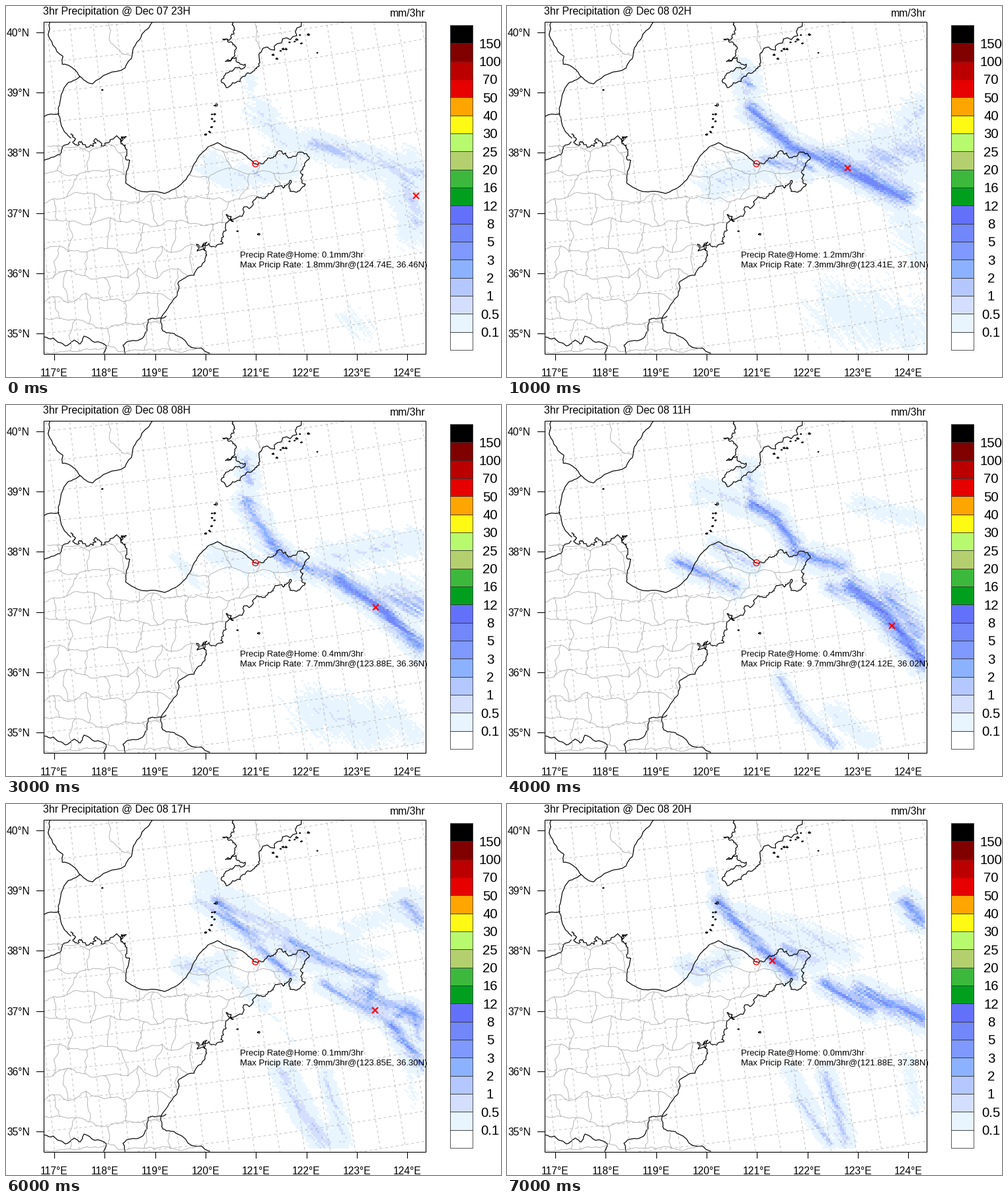
A matplotlib script that plays this animation: 749 by 562 pixels, repeating every 8 s.

```python
import numpy as np
import matplotlib.pyplot as plt
from matplotlib.animation import FuncAnimation
from matplotlib.colors import ListedColormap
from matplotlib.patches import Circle, Rectangle
from matplotlib.path import Path

W, H, DPI = 749, 562, 64
PX = 72 / DPI  # points per pixel
L, R, T, B = 56.5, 634.5, 24, 526.5
LEVELS = [0.1, 0.5, 1, 2, 3, 5, 8, 12, 16, 20, 25, 30, 40, 50, 70, 100, 150]
COLORS = ["#ffffff", "#e8f5ff", "#d4dfff", "#b4c8ff", "#8cb2ff", "#7f99ff",
          "#7187fa", "#6371fa", "#00a01e", "#3cb93c", "#b4d06e", "#b8fa6e",
          "#fffa14", "#ffa500", "#e60000", "#bb0000", "#800000", "#000000"]
rng = np.random.default_rng(7)

plt.rcParams["font.family"] = "Liberation Sans"
fig = plt.figure(figsize=(W / DPI, H / DPI), dpi=DPI, facecolor="white")
# Both axes use stage pixels; the chart is cropped to the map frame
chart = fig.add_axes([L / W, 1 - B / H, (R - L) / W, (B - T) / H])
ax = fig.add_axes([0, 0, 1, 1])
for a in (chart, ax):
    a.axis("off")


def label(x, y, s, size, **kw):
    return ax.text(x, y, s, fontsize=size * PX, **kw)


def project(lon, lat):
    """Lambert conic position in pixels."""
    a = 0.0105 * (lon - 108.08)
    rho = 6930 - 90.8 * (lat - 37)
    return -594.6 + rho * np.sin(a), -6586 + rho * np.cos(a)


def fractal(pts, rough, rounds):
    """Midpoint displacement: a natural outline through a few key points."""
    p = np.array(pts, float)
    for _ in range(rounds):
        d = np.diff(p, axis=0)
        normal = np.column_stack([-d[:, 1], d[:, 0]])
        mid = p[:-1] + d / 2 + normal * rng.uniform(-rough, rough, (len(d), 1))
        out = np.empty((2 * len(p) - 1, 2))
        out[::2], out[1::2] = p, mid
        p = out
    return p


def line(*pts, rough=0.15, rounds=3, color="black", width=1.2):
    p = fractal(pts, rough, rounds)
    artist, = chart.plot(*p.T, color=color, lw=width * PX, zorder=4)
    return p, artist


# Rain: bands along short paths, broken up by streaky noise
CELL = 3
gx, gy = np.meshgrid(np.arange(58, 632, CELL), np.arange(26, 522, CELL))
steps = []


def streaks(noise, slope, length=14):
    shifts = [np.roll(noise, (round(slope * k), k), (0, 1)) for k in range(length)]
    return sum(shifts) / length ** 0.5


def distance(pts):
    best = np.full(gx.shape, np.inf)
    for (x0, y0), (x1, y1) in zip(pts, pts[1:]):
        dx, dy = x1 - x0, y1 - y0
        t = np.clip(((gx - x0) * dx + (gy - y0) * dy) / (dx * dx + dy * dy), 0, 1)
        best = np.minimum(best, np.hypot(gx - x0 - t * dx, gy - y0 - t * dy))
    return best


def band(rate, width, *pts):
    return rate * np.exp(-distance(pts) / width)


def step(hour, home, peak, lon, lat, *bands):
    noise = np.random.default_rng(len(steps)).normal(size=gx.shape)
    texture = np.where(gy < 400, streaks(noise, 0.6), streaks(noise, 1.4))
    rain = np.max(bands, axis=0) * np.exp(0.4 * texture) if bands else None
    steps.append([hour, home, peak, lon, lat, rain])


step("07 23H", 0.1, 1.8, 124.74, 36.46,
     band(.25, 10, (368, 108), (370, 122)),
     band(.4, 14, (385, 160), (420, 205), (470, 215)),
     band(1.2, 9, (465, 210), (545, 232)),
     band(.8, 11, (545, 235), (625, 255)),
     band(.7, 16, (600, 250), (622, 330)),
     band(.4, 14, (310, 245), (345, 258), (425, 245)),
     band(.15, 18, (515, 470), (545, 490)))
step("08 02H", 1.2, 7.3, 123.41, 37.10,
     band(1.2, 9, (360, 105), (366, 128)),
     band(4.5, 6, (368, 155), (430, 215), (500, 238)),
     band(6, 7, (490, 236), (600, 290)),
     band(1, 22, (550, 235), (628, 220)),
     band(.6, 14, (605, 185), (628, 155)),
     band(1.4, 8, (390, 235), (460, 245)),
     band(.45, 16, (310, 270), (400, 240)),
     band(.25, 40, (500, 460), (610, 490)),
     band(.3, 18, (600, 320), (625, 380)))
step("08 05H", 0.8, 7.5, 123.65, 36.73)
step("08 08H", 0.4, 7.7, 123.88, 36.36,
     band(1.5, 7, (362, 88), (368, 115)),
     band(3, 6.5, (362, 148), (405, 215), (425, 235)),
     band(2, 7, (425, 235), (500, 262)),
     band(5, 6, (500, 262), (560, 302), (625, 365)),
     band(1.4, 15, (570, 290), (625, 305)),
     band(.35, 16, (480, 235), (628, 205)),
     band(.35, 14, (320, 230), (400, 240)),
     band(.25, 8, (255, 230), (290, 275)),
     band(.4, 25, (470, 465), (550, 490)),
     band(.25, 16, (580, 460), (620, 505)))
step("08 11H", 0.4, 9.7, 124.12, 36.02,
     band(.9, 8, (365, 95), (370, 145)),
     band(4, 6, (370, 152), (405, 170), (435, 212)),
     band(2.8, 7, (435, 222), (505, 246)),
     band(.5, 12, (295, 130), (350, 150)),
     band(1, 7, (315, 212), (370, 245)),
     band(2.2, 6, (258, 238), (345, 278)),
     band(2.2, 6, (490, 276), (540, 298)),
     band(6, 7, (520, 276), (570, 315), (628, 388)),
     band(2, 12, (575, 290), (620, 345)),
     band(.3, 11, (530, 150), (625, 175)),
     band(1.2, 5.5, (412, 415), (445, 470), (495, 515)),
     band(.35, 12, (490, 465), (548, 510)))
step("08 14H", 0.1, 8.8, 124.19, 35.87,
     band(.4, 12, (290, 120), (370, 150)),
     band(1.9, 6, (290, 145), (340, 183), (440, 212)),
     band(1.3, 9, (320, 150), (425, 190)),
     band(4.5, 5, (430, 208), (480, 238), (560, 264)),
     band(2.5, 5, (558, 266), (545, 305), (590, 338)),
     band(6, 5.5, (582, 335), (628, 393)),
     band(3, 5, (592, 322), (612, 308), (625, 355)),
     band(.4, 17, (520, 190), (625, 148)),
     band(.35, 10, (440, 200), (570, 230)),
     band(.7, 7, (260, 245), (335, 258), (392, 308)),
     band(.25, 7, (395, 310), (432, 360)),
     band(1.3, 9, (415, 405), (445, 470), (480, 520)))
step("08 17H", 0.1, 7.9, 123.85, 36.30)
step("08 20H", 0.0, 7.0, 121.88, 37.38,
     band(.4, 6, (307, 105), (317, 145)),
     band(4.2, 5, (318, 147), (360, 195), (430, 260)),
     band(.5, 14, (350, 170), (510, 225)),
     band(1.2, 9, (420, 218), (465, 240)),
     band(.8, 9, (272, 245), (290, 255), (335, 232)),
     band(3.5, 6, (480, 273), (550, 312)),
     band(4, 7, (530, 284), (628, 325)),
     band(3, 7, (605, 150), (626, 176)),
     band(.4, 9, (425, 405), (465, 470)),
     band(1.2, 7, (482, 412), (512, 512)),
     band(.8, 6, (440, 445), (488, 515)),
     band(.2, 12, (608, 390), (618, 460)))
for i, s in enumerate(steps):
    if s[5] is None:
        s[5] = (steps[i - 1][5] + steps[i + 1][5]) / 2

half = CELL / 2
image = chart.imshow(np.zeros(gx.shape), aspect="auto", interpolation="nearest",
                     extent=(gx.min() - half, gx.max() + half, gy.max() + half, gy.min() - half),
                     cmap=ListedColormap(COLORS), vmin=-0.5, vmax=17.5)
chart.set(xlim=(L, R), ylim=(B, T))
ax.set(xlim=(0, W), ylim=(H, 0))

# Graticule
grid = dict(color="#b4b4b4", lw=0.8 * PX, dashes=(5, 5), zorder=3)
for lon in np.arange(116.5, 127, 0.5):
    chart.plot(*project(lon, np.linspace(34, 41, 30)), **grid)
for lat in np.arange(33.5, 41, 0.5):
    chart.plot(*project(np.linspace(116, 127, 60), lat), **grid)

# Coasts: bay shore, delta, smooth gulf, rugged peninsula, southern shore
line((67, 24), (65, 38), (86, 76), (85, 88), (98, 92), (112, 107))
line((222, 24), (206, 42), (193, 63), (180, 94), (131, 118), (112, 107),
     (94, 116), (79, 155), (84, 182), (98, 200), rough=0.1)
line((56, 168), (80, 163), rough=0.08)
line((56, 236), (82, 225), (85, 213), (97, 206))
delta, _ = line((98, 194), (101, 206), (120, 210), (150, 211), (182, 198), (181, 214),
                (187, 234), rough=0.5, rounds=4)
gulf, _ = line((187, 234), (181, 268), (205, 281), (240, 284), (265, 270), (288, 235),
               (305, 214), (320, 207), (358, 223), (374, 236), rough=0.07)
cape, _ = line((374, 236), (400, 231), (414, 219), (431, 230), (458, 228), (446, 250),
               (453, 270), (430, 281), (431, 264), (420, 276), (395, 288), (374, 301),
               (333, 316), (344, 326), (328, 345), (328, 360), (289, 371), (288, 361),
               (304, 358), (303, 378), rough=0.33, rounds=4)
south, _ = line((303, 378), (284, 408), (260, 420), (258, 440), (234, 478), (237, 492),
                (260, 500), (308, 526))
line((242, 470), (215, 475), (203, 505), (177, 514), (180, 526))
line((56, 502), (72, 503), (90, 515), (103, 506), (112, 512), (118, 500), (152, 515),
     (148, 526))
line((342, 24), (345, 42), (328, 50), (348, 62), (332, 84), (362, 88), (330, 106),
     (334, 124), (372, 101), (384, 86), (386, 70), (447, 24), rough=0.33, rounds=4)


def islands(n, x0, y0, x1, y1):
    for t in np.linspace(0, 1, n):
        x, y = np.array([x0 + t * (x1 - x0), y0 + t * (y1 - y0)]) + rng.normal(0, 3, 2)
        r = rng.uniform(0.7, 2.5)
        line((x - r, y), (x, y - r), (x + r, y), (x, y + r / 2), (x - r, y),
             rough=0.4, rounds=1)


islands(9, 319, 157, 305, 196)
islands(11, 403, 74, 456, 44)
islands(2, 351, 344, 381, 343)
islands(1, 468, 72, 468, 72)
islands(1, 147, 126, 147, 126)

# Counties: a jittered honeycomb cropped to the land
land = Path(np.vstack([[(L, 215)], delta, gulf, cape, south, [(L, B)]]))
NX, NY = 17, 9
nodes = np.stack(np.meshgrid(np.arange(NX) * 26 + 48, np.arange(NY) * 38 + 215), -1)
nodes = nodes + rng.uniform(-8, 8, nodes.shape)
THIN = dict(color="#a6a6a6", width=0.8)


def county(a, b):
    line(a, b, **THIN)[1].set_clip_path(land, chart.transData)


for j in range(NY):
    for i in range(NX):
        if i + 1 < NX:
            county(nodes[j, i], nodes[j, i + 1])
        if j + 1 < NY and (i + j) % 2:
            county(nodes[j, i], nodes[j + 1, i])
line((155, 24), (156, 50), (175, 72), (190, 75), **THIN)
line((377, 24), (378, 52), (385, 66), **THIN)

# Axes
ax.add_patch(Rectangle((L, T), R - L, B - T, fill=False, lw=1.1 * PX))
for i in range(6):
    y = 40 + 91.2 * i
    ax.plot([46, L], [y, y], "k", lw=1.1 * PX)
    label(36, y + 6, f"{40 - i}°N", 15.6, ha="right")
for i in range(8):
    x = 73 + 76.3 * i
    ax.plot([x, x], [B, 536], "k", lw=1.1 * PX)
    label(x, 561, f"{117 + i}°E", 15.6, ha="center")
label(R + 0.5, 15.5, "mm/3hr", 15.7, ha="right")

# Colour bar
BOX = 492 / 18
for i, c in enumerate(COLORS):
    ax.add_patch(Rectangle((671.5, 521 - (i + 1) * BOX), 34.5, BOX, fc=c,
                           ec="#303030", lw=0.8 * PX))
for i, v in enumerate(LEVELS):
    label(732.5, 521 - (i + 1) * BOX + 7.3, f"{v:g}", 20.4, ha="center")

# Home and changing parts
ax.add_patch(Circle((377.5, 239), 4.6, fill=False, ec="red", lw=1.3 * PX))
ax.add_patch(Circle((377.5, 239), 1.3, fc="red", lw=0))
cross, = ax.plot([], [], "x", color="red", ms=9 * PX, mew=2.2 * PX)
title = label(56, 12.5, "", 15.85)
home_text = label(354.5, 381, "", 13.1)
max_text = label(354.5, 396, "", 13.1)


def update(i):
    hour, home, peak, lon, lat, rain = steps[i]
    image.set_data(np.digitize(np.minimum(rain, peak), LEVELS))
    x, y = project(lon, lat)
    cross.set_data([x], [y])
    title.set_text(f"3hr Precipitation @ Dec {hour}")
    home_text.set_text(f"Precip Rate@Home: {home:.1f}mm/3hr")
    max_text.set_text(f"Max Pricip Rate: {peak:.1f}mm/3hr@({lon:.2f}E, {lat:.2f}N)")
    return image, cross, title, home_text, max_text


anim = FuncAnimation(fig, update, frames=len(steps), interval=1000, repeat=True)
plt.show()
```
